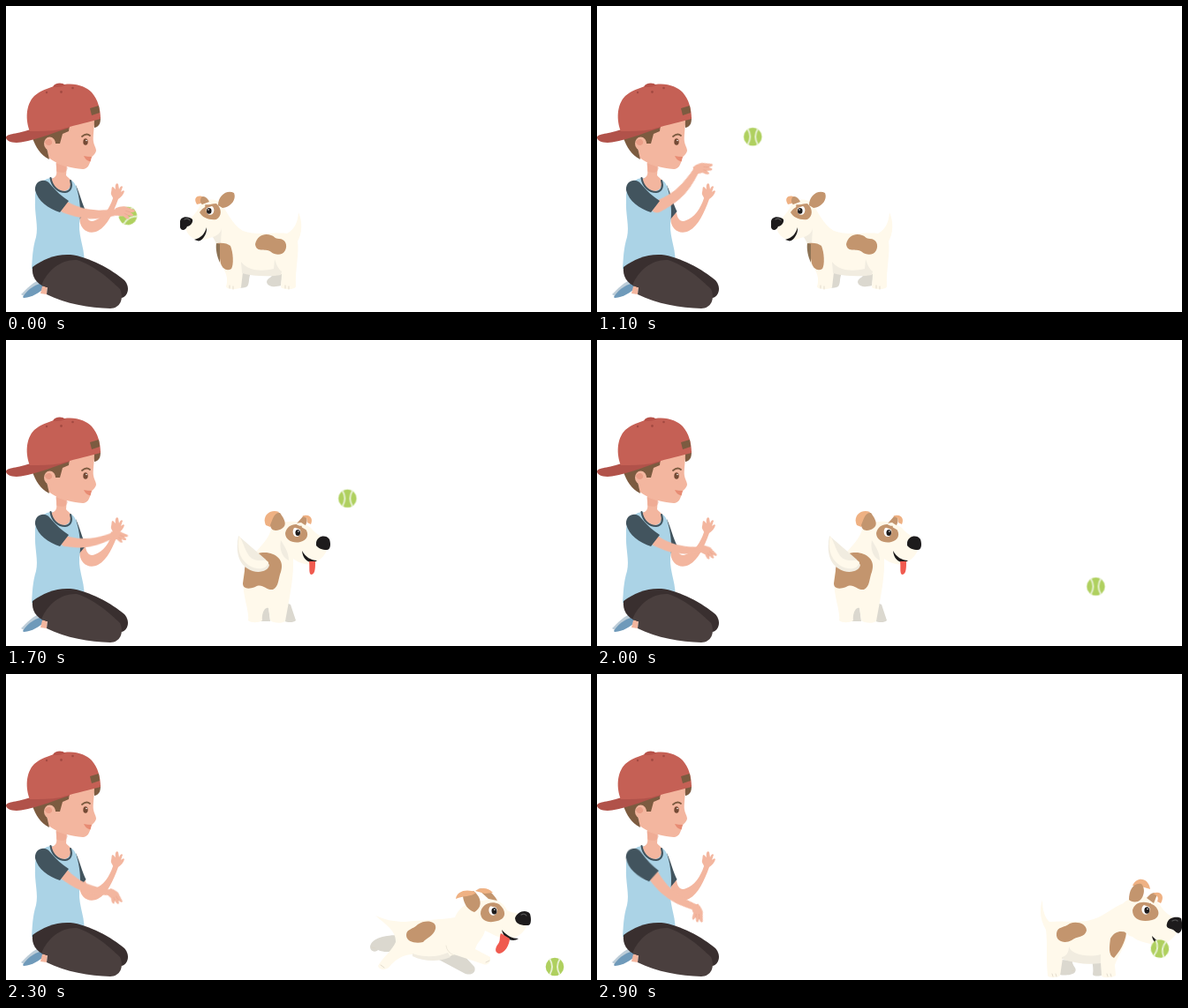
Write an HTML page that moves like this. It is 662x347 px and loops after 4900 ms.

```html
<!DOCTYPE html>
<html lang="en">
<head>
<meta charset="utf-8">
<title>Boy throwing a ball for his dog</title>
<style>
html, body { margin: 0; width: 100%; height: 100%; overflow: hidden; background: #fff; }
svg { display: block; width: 100%; height: 100%; }

.skin { fill: #f3b69f; }
.skin-dark { fill: #e99e87; }
.hair { fill: #7c5b40; }
.navy { fill: #42545e; }
.shirt { fill: #abd3e6; }
.cream { fill: #fff9eb; }
.shade { fill: #f1ece0; }
.grey { fill: #dbd8cf; }
.brown { fill: #c3956e; }
.peach { fill: #efb183; }
.black { fill: #1d1b1c; }
.red { fill: #f05a4f; }
.line { fill: none; stroke-linecap: round; }
.toe { fill: none; stroke: #dcd5c6; stroke-width: .8; stroke-linecap: round; }

.anim { animation: 4.9s linear infinite; }
.ball { animation-name: ball; }
.sleeve { animation-name: sleeve; transform-origin: 42px 205px; }
.arm { animation-name: arm; transform-origin: 67px 227px; }
.hand { animation-name: hand; transform-origin: 124px 227px; }
.sit { animation-name: sit; }
.turn { animation-name: turn; }
.run { animation-name: run; }
.fetch { animation-name: fetch; }
.head { animation-name: head; transform-origin: 600px 280px; }

/* one step lasts 100 ms, 2.04 % of the loop */
@keyframes ball {
  0% { transform: translate(138px, 238px) rotate(60deg); animation-timing-function: steps(5); }
  10.2% { transform: translate(138px, 192px) rotate(5deg); animation-timing-function: steps(1); }
  12.24% { transform: translate(139.5px, 184.5px) rotate(0deg); animation-timing-function: steps(5); }
  22.44% { transform: translate(176.3px, 148.2px) rotate(0deg); animation-timing-function: steps(1); }
  24.48% { transform: translate(203px, 147px) rotate(0deg); animation-timing-function: steps(3); }
  30.61% { transform: translate(341.3px, 163px) rotate(0deg); animation-timing-function: steps(3); }
  36.73% { transform: translate(409px, 188px) rotate(0deg); animation-timing-function: steps(2); }
  40.81% { transform: translate(564.5px, 279.5px) rotate(0deg); animation-timing-function: steps(1); }
  42.85% { transform: translate(600px, 311px) rotate(0deg); animation-timing-function: steps(2); }
  46.93% { transform: translate(621px, 332px) rotate(0deg); animation-timing-function: steps(1); }
  48.97% { transform: translate(617px, 328.5px) rotate(35deg); animation-timing-function: steps(5); }
  59.18%, to { transform: translate(637px, 311.5px) rotate(8deg); }
}
@keyframes arm {
  0% { transform: rotate(6deg) scale(1.06); animation-timing-function: steps(5); }
  10.2% { transform: rotate(-31deg) scale(1.06); animation-timing-function: steps(1); }
  12.24% { transform: rotate(-38deg) scale(1.08); animation-timing-function: steps(5); }
  22.44% { transform: rotate(-42deg) scale(1.08); animation-timing-function: steps(4); }
  30.61% { transform: rotate(-17deg) scale(.96); animation-timing-function: steps(5); }
  40.81% { transform: rotate(11deg) scale(.95); animation-timing-function: steps(3); }
  46.93% { transform: rotate(22deg) scale(.97); animation-timing-function: steps(6); }
  59.18%, to { transform: rotate(34deg) scale(1.03); }
}
@keyframes hand {
  0% { transform: rotate(-6deg); animation-timing-function: steps(5); }
  10.2% { transform: rotate(6deg); animation-timing-function: steps(1); }
  12.24% { transform: rotate(18deg); animation-timing-function: steps(5); }
  22.44% { transform: rotate(27deg); animation-timing-function: steps(4); }
  30.61% { transform: rotate(8deg); animation-timing-function: steps(5); }
  40.81% { transform: rotate(16deg); animation-timing-function: steps(3); }
  46.93% { transform: rotate(20deg); animation-timing-function: steps(6); }
  59.18%, to { transform: rotate(32deg); }
}
@keyframes sleeve {
  0%, 46.93% { transform: none; animation-timing-function: steps(6); }
  59.18%, to { transform: rotate(4deg); }
}
@keyframes sit {
  0% { opacity: 1; animation-timing-function: step-end; }
  34.69%, to { opacity: 0; }
}
@keyframes turn {
  0% { opacity: 0; transform: none; animation-timing-function: step-end; }
  34.69% { opacity: 1; transform: none; animation-timing-function: step-end; }
  38.77% { opacity: 1; transform: translateY(-5px); animation-timing-function: step-end; }
  40.81% { opacity: 1; transform: none; animation-timing-function: step-end; }
  42.85%, to { opacity: 0; transform: none; }
}
@keyframes run {
  0% { opacity: 0; transform: translateX(-150px); animation-timing-function: step-end; }
  42.85% { opacity: 1; transform: translateX(-150px); animation-timing-function: steps(2); }
  46.93% { opacity: 1; transform: none; animation-timing-function: step-end; }
  48.97%, to { opacity: 0; transform: none; }
}
@keyframes fetch {
  0% { opacity: 0; animation-timing-function: step-end; }
  48.97%, to { opacity: 1; }
}
@keyframes head {
  0%, 48.97% { transform: rotate(30deg); animation-timing-function: steps(5); }
  59.18%, to { transform: none; }
}
</style>
</head>
<body>
<svg viewBox="0 0 662 347" preserveAspectRatio="none">
  <defs>
    <g id="eye">
      <ellipse rx="4.600" ry="5.800" fill="#fff"/>
      <ellipse class="black" cx="1.300" cy="1" rx="2.900" ry="3.700"/>
      <circle cx="2" cy="-.5" r=".8" fill="#fff"/>
      <path class="brown" d="M-5-7L6-7L6-2L-2-5Z"/>
    </g>
  </defs>

  <!-- dog facing left -->
  <g class="anim sit">
    <path class="grey" d="M264 302L277 303C274 309 276 314 273 318C270 320 265 320 263 319ZM302 302L313 303L311 317C305 319 296 319 295 313C296 307 302 309 302 302Z"/>
    <path class="cream" d="M220 225C227 218 237 218 243 224C250 232 255 247 268 255C285 261 305 256 318 258C328 252 330 244 331 234C336 246 335 258 330 267C332 280 327 300 328 318C327 322 314 322 311 319L312 304C300 307 280 307 268 302L266 319C262 322 250 322 249 318C252 310 249 300 242 292C240 283 238 274 236 262C230 262 225 267 215 265C207 262 203 255 203 249C207 241 215 237 220 225Z"/>
    <path class="shade" d="M266 290C274 301 290 301 303 298L304 287C306 294 309 299 312 301L311 305C300 307 280 307 267 303ZM234 262C240 260 243 257 244 252L243 269L238 269Z"/>
    <path class="brown" d="M239 269C244 268 251 269 254 272C257 279 258 293 255 298C250 301 245 298 243 292Z"/>
    <path d="M238 269L242 270L242 291C239 285 237 276 238 269Z" fill="#8d7355"/>
    <path class="brown" d="M282 270C284 260 293 257 300 260C304 261 304 264 309 264C316 264 319 271 316 277C313 283 305 283 300 279C296 274 283 281 282 270Z"/>
    <path class="peach" d="M216 225C212 219 215 214 222 216L226 218L220 224Z"/>
    <path class="brown" d="M221 217C224 214 229 219 230 222L222 225C219 223 220 219 221 217ZM240 226C240 215 250 208 258 212C261 219 255 228 245 229ZM219 234C222 229 230 224 238 224C245 230 244 239 238 242C230 243 222 240 219 234Z"/>
    <use href="#eye" transform="translate(231 231.500) scale(-.95 .9)"/>
    <path class="black" d="M197 244C198 238 207 238 211 242C212 246 208 250 205 250C203 255 198 255 197 251Z"/>
    <path class="line" d="M202 242Q206 240 208 243" stroke="#555" stroke-width="1.200"/>
    <path class="black" d="M213 265C221 263 225 258 227 251C228 257 223 266 218 266.500Z"/>
    <path class="toe" d="M253 317v3M257 318v3M316 317v3M320 318v3"/>
  </g>

  <!-- dog turning round -->
  <g class="anim turn">
    <path class="grey" d="M290 302L297 302L299 319L286 319ZM317 298L322 300L328 318C325 321 318 320 315 319Z"/>
    <path class="cream" d="M300 215C309 204 331 202 345 213C352 222 360 223 365 231C364 242 356 250 347 254C338 256 329 251 325 248C326 270 320 296 316 319C312 322 302 321 299 318L297 304C293 302 289 310 290 318C286 321 277 321 274 318C276 305 264 285 270 260C278 240 295 232 300 215Z"/>
    <path class="shade" d="M311 227C309 237 312 246 320 250C320 240 315 234 311 227Z"/>
    <path class="brown" d="M270 262C270 248 282 240 295 241C308 243 315 251 311 263C308 270 309 280 302 283C294 284 290 275 282 280C274 283 268 282 268 276Z"/>
    <path class="shade" d="M263 222C260 238 262 252 273 259C283 266 297 263 298 255L294 249Z"/>
    <path class="cream" d="M264 222C261 235 264 248 274 255C284 262 296 260 297 252C294 247 287 252 281 249C272 246 270 232 264 222Z"/>
    <path class="peach" d="M294 210C289 199 299 191 309 195L299 212Z"/>
    <path class="brown" d="M299 210C302 202 304 195 310 196C315 203 320 211 310 215C304 217 300 216 299 210ZM329 208L337 199C342 201 341 206 339 210ZM316 219C318 208 331 206 338 213C344 220 341 227 333 229C325 231 316 227 316 219Z"/>
    <path class="peach" d="M335 200C344 196 348 203 345 209L341 207C342 202 339 201 335 200Z"/>
    <path class="cream" d="M327 208L341 216L340 211L334 207Z"/>
    <use href="#eye" transform="translate(329 217.500) scale(.95)"/>
    <path class="black" d="M351 230C352 222 362 220 366 226C368 232 367 238 363 238C358 238 353 236 351 233ZM335 239C339 246 345 250 352 250C346 255 336 251 335 239Z"/>
    <path class="red" d="M343 251L350 251C350 258 350 265 346 266C342 266 344 258 343 251Z"/>
  </g>

  <!-- dog running -->
  <g class="anim run">
    <path class="grey" d="M445 296C430 296 414 299 412 309C412 315 418 316 421 313C431 317 440 315 446 308ZM494 317L518 319L530 332C533 339 525 343 518 339L490 324Z"/>
    <path class="cream" d="M418 274C430 279 440 281 452 281C470 279 492 279 508 276C512 266 522 257 540 257C553 252 564 260 567 268C575 273 588 270 592 277C590 291 580 300 566 301C557 299 549 294 542 291C540 300 533 304 531 312L548 321C549 328 544 331 540 329L507 318C490 327 472 326 460 318C450 318 440 324 434 332C430 336 422 336 421 331C426 322 438 312 441 304C442 292 430 284 418 274Z"/>
    <path class="shade" d="M460 317C475 322 488 321 500 316L503 321C490 327 472 326 460 320Z"/>
    <path class="line" d="M498 308Q499 316 507 319" stroke="#eee8d9" stroke-width="1"/>
    <path class="brown" d="M453 296C453 289 460 290 466 284C475 278 488 280 486 289C484 297 476 299 472 304C464 306 453 304 453 296ZM517 252L529 246C538 253 540 264 530 270C523 268 518 261 517 252ZM534 244C541 241 551 247 556 257L546 255ZM537 272C537 262 548 256 558 261C566 268 567 277 556 280C546 283 538 280 537 272Z"/>
    <path class="peach" d="M509 255C510 246 522 243 532 248C526 253 518 251 509 255ZM531 246C539 241 546 243 551 248L542 249Z"/>
    <use href="#eye" transform="translate(551 268) rotate(-8)"/>
    <path class="black" d="M576 277C578 270 588 266 593 272C595 279 594 286 590 285C585 285 577 285 576 277ZM561 290C567 297 573 300 580 300C574 304.500 563 301 561 290Z"/>
    <path class="red" d="M560 294L570 300C570 307 564 317 558 317C553 316 553 311 557 306C560 302 558 298 560 294Z"/>
    <path class="line" d="M583 273Q587 271 589 274" stroke="#555" stroke-width="1.200"/>
    <path class="toe" d="M424 330l4 3M543 327l4-2M414 310l4 1M524 337l4-1"/>
  </g>

  <!-- dog with the ball -->
  <g class="anim fetch">
    <path class="grey" d="M525 324L538 325C537 331 544 333 541 338C538 342 527 342 524 341ZM560 324L574 325L572 341C569 343 563 343 561 341C562 335 561 330 560 324Z"/>
    <path class="cream" d="M504 256C504 268 507 277 512 281C530 279 548 283 562 278C575 274 584 264 596 260C608 268 610 286 599 294C600 306 590 318 586 330L587 342C582 345 571 345 571 342L570 327C555 330 540 328 527 322L524 342C520 345 509 345 510 341C508 325 510 305 508 290C502 280 500 268 504 256Z"/>
    <path class="shade" d="M526 321C531 320 534 316 534 309C536 318 556 322 570 318L570 328C555 330 540 328 526 323Z"/>
    <path class="brown" d="M581 300C586 291 593 291 599 293C598 305 591 315 585 322C578 319 580 308 581 300ZM520 294C521 286 529 288 535 283C543 280 554 283 554 291C552 299 543 297 537 302C530 306 519 304 520 294Z"/>
    <path class="toe" d="M515 340l1 3M519 340l1 3M577 340l1 3M581 340l1 3M537 337l3-1"/>
    <g class="anim head">
      <path class="cream" d="M594 262C602 250 630 248 637 262C645 275 655 276 660 282C660 292 652 300 643 306C628 308 613 304 606 298C594 296 588 275 594 262Z"/>
      <path class="peach" d="M606 240C611 229 624 231 626 244L616 241Z"/>
      <path class="brown" d="M602 256C602 245 607 236 616 238C622 244 618 256 612 258C608 259 604 258 602 256ZM622 254C627 248 631 246 634 250L630 260ZM606 268C608 258 620 256 630 262C638 268 637 277 628 279C616 282 606 278 606 268Z"/>
      <path class="peach" d="M629 249C638 245 643 252 638 260L634 258C636 253 634 251 629 249Z"/>
      <use href="#eye" x="621" y="267"/>
      <path class="black" d="M645 283C646 276 656 274 661 277C663 284 663 292 658 294C654 293 654 290 649 289C645 288 644 286 645 283ZM628 297C633 302 637 305 642 306C637 310 629 305 628 297Z"/>
      <path class="line" d="M651 280Q655 278 657 280" stroke="#555" stroke-width="1.200"/>
    </g>
  </g>

  <g class="anim ball">
    <circle r="10.300" fill="#afd05f"/>
    <path class="line" d="M-5.500-8.500Q-.5 0-5.500 8.500M5.500-8.500Q.5 0 5.500 8.500" stroke="#e8f1d4" stroke-width="1.900"/>
  </g>

  <!-- boy -->
  <path class="skin" d="M83 239C83 254 94 260 104 255C115 249 121 235 127 219C130 217 133 214 134 210C133 208 131 210 130 211L132 205C131 203 129 205 128 208L127 202C125 200 123 203 124 208L121 205C119 205 120 208 119 211C118 214 121 216 121 218C117 230 110 240 101 243C95 246 91 242 90 234Z"/>
  <path class="navy" d="M79 203C84 214 86 224 90.500 233L83 242Z"/>
  <path class="shirt" d="M50 195C38 198 32 206 33 220C32 235 37 250 34 262C30 275 30 285 29 298L88 296C91 278 82 264 83 247C86 230 82 212 79 204Q77 199 73 197Z"/>
  <path class="skin" d="M57 174L69 179L68 192C70 195 74 196 74 200C73 207 69 210 64 210C57 208 52 202 51 196C56 195 58 191 57 187Z"/>
  <path class="skin-dark" d="M56 178L70 183C69 188 66 190 58 188Z" opacity=".4"/>
  <path class="line" d="M50.500 195C52 205 59 211 67 211C74 210 75 204 73 198" stroke="#42545e" stroke-width="2"/>

  <path class="hair" d="M98 128L107 126C107 132 106 137 100 138Z"/>
  <path class="skin" d="M44 146L66 130L100 127C100 140 98 148 99 154C100 159 102 161 102 164C101 169 97 170 96 173C95 180 92 185 87 185C74 184 60 181 48 172Z"/>
  <path class="hair" d="M30 150L72 134L71 142L64 145L61 156L56 156L54 151L45 156L49 174C38 168 34 160 30 150Z"/>
  <ellipse class="skin" cx="49.500" cy="156" rx="6.500" ry="7.500"/>
  <path class="skin-dark" d="M44 154C47 149 53 151 52 156C50 159 45 159 44 154Z"/>
  <path class="line" d="M86 148Q91 143.500 95 147" stroke="#7c5b40" stroke-width="1.800"/>
  <ellipse cx="90" cy="154" rx="2.700" ry="3.800" fill="#744a35"/>
  <circle cx="91" cy="152.500" r=".8" fill="#fff"/>
  <path d="M88 170Q92 171 97 171L95.500 176.500Q90 175 88 170Z" fill="#e78b73"/>

  <path d="M30 139L70 134L72 138C58 142 38 151 17 154.500C7 156 0 153 0 149C1 145 8 146 28 140Z" fill="#b1524a"/>
  <path d="M27 142C22 130 22 112 32 102C40 95 47 94 54 91L66 89C80 87 91 92 97 98C104 106 107 117 107 128C88 133 74 136 62 140C50 142 39 142 27 142Z" fill="#c56055"/>
  <path d="M53 91.500C55 87 64 86 67 90Q60 93 53 91.500Z" fill="#b75249"/>
  <g fill="#a34a42"><circle cx="46" cy="98" r="1.200"/><circle cx="62.500" cy="97.500" r="1.400"/><circle cx="75.500" cy="93" r="1.300"/></g>
  <path class="hair" d="M95 116L105 113L106 121L97 124Z"/>

  <path d="M17 327C24 320 31 313 39 310L43 313L22 330Z" fill="#bdcdd8"/>
  <path d="M19 330C25 320 35 315 43 314L41 322C35 327 26 331 20 331Z" fill="#6f9aba"/>
  <path class="skin" d="M41 318L47 317L46 327L39 326Z"/>
  <path d="M30 296C42 287 56 281 73 282C93 284 120 299 134 311C141 319 138 329 131 331L46 319C33 315 29 306 30 296Z" fill="#392f2f"/>
  <path d="M40 317C47 299 63 287 80 288C98 293 118 310 129 321C134 332 129 343 118 343C94 342 68 338 46 327L47 319Z" fill="#4a3f3e"/>

  <g class="anim sleeve">
    <g class="anim arm">
      <path class="skin" d="M66 221C88 230 102 229 124 223.500L124 230.500C102 239 88 240 65 234C58 231 60 221 66 221Z"/>
      <g class="anim hand">
        <path class="skin" d="M121 223.300C126 221 131 220.500 134 222.500L141 225C143 227 140 228 137 227.500L140 230C140 232.500 137 231.500 134 230.500L136 234C134 236 131 233 129 231.500C126 232 123 231 121 231Z"/>
        <path class="line" d="M132 226l5 1.500M131 229l3 1.500" stroke="#e7a48d" stroke-width=".7"/>
      </g>
    </g>
    <path class="navy" d="M33 209C32 198 44 194 50 202C57 210 63 216 71 221L61 234C48 230 36 221 33 209Z"/>
  </g>
</svg>
</body>
</html>
```
